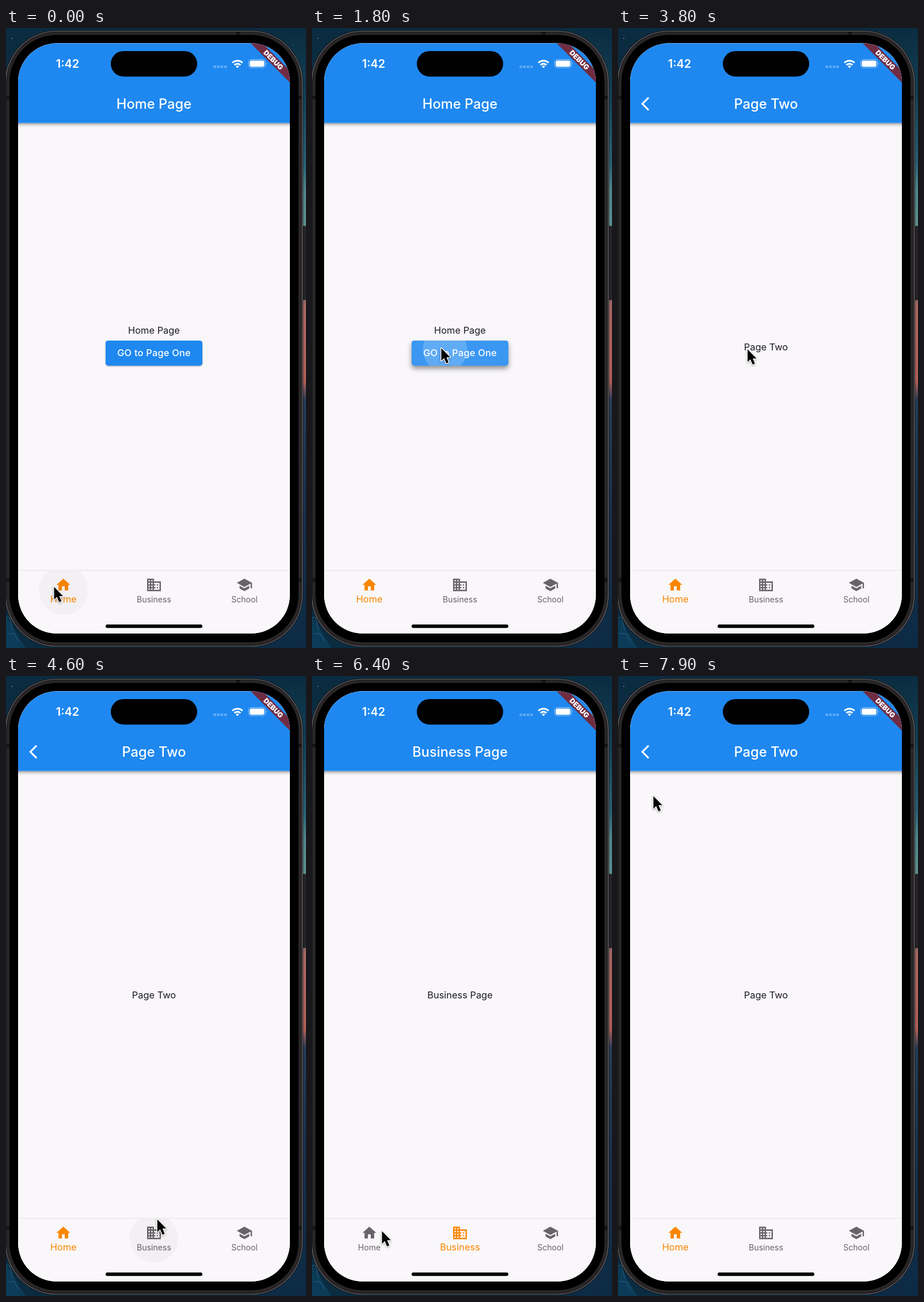
An HTML page that plays this animation: 521 px wide and 1075 px high, repeating every 8 s.

```html
<!DOCTYPE html>
<html lang="en">
<head>
<meta charset="utf-8">
<title>Tab navigation demo</title>
<style>
  html, body { margin: 0; width: 100%; height: 100%; overflow: hidden; background: #0a2b40; }
  svg { display: block; width: 521px; height: 1075px; font-family: Inter, Roboto, sans-serif; }
  .mid { text-anchor: middle; }
  .title { font-size: 23.7px; font-weight: 500; fill: #fff; }
  .body { font-size: 16.4px; fill: #1d1b20; }
  .btn { font-size: 16.4px; font-weight: 500; fill: #fff; letter-spacing: .2px; }
</style>
</head>
<body>
<svg viewBox="0 0 521 1075" xmlns="http://www.w3.org/2000/svg">
  <defs>
    <clipPath id="screen"><rect x="21" y="26.6" width="472" height="1023.2" rx="67"/></clipPath>
    <clipPath id="btnClip"><rect x="173" y="542" width="168" height="43.4" rx="4.5"/></clipPath>
    <clipPath id="navClip"><rect x="21" y="941" width="472" height="109"/></clipPath>
    <linearGradient id="wall" x1="0" y1="0" x2="0" y2="1">
      <stop offset="0" stop-color="#0b2c40"/>
      <stop offset=".11" stop-color="#123f55"/>
      <stop offset=".22" stop-color="#286174"/>
      <stop offset=".26" stop-color="#4b8487"/>
      <stop offset=".32" stop-color="#5c8f8e"/>
      <stop offset=".43" stop-color="#7e6c6c"/>
      <stop offset=".45" stop-color="#a7645f"/>
      <stop offset=".57" stop-color="#b05d55"/>
      <stop offset=".6" stop-color="#243c55"/>
      <stop offset=".8" stop-color="#142f4a"/>
      <stop offset="1" stop-color="#0d2b45"/>
    </linearGradient>
    <linearGradient id="barShade" x1="0" y1="0" x2="0" y2="1">
      <stop offset="0" stop-opacity=".38"/>
      <stop offset=".45" stop-opacity=".13"/>
      <stop offset="1" stop-opacity="0"/>
    </linearGradient>
  </defs>

  <rect width="521" height="1075" fill="#0b2b40"/>
  <rect x="440" width="81" height="1075" fill="url(#wall)"/>
  <path d="M0 1020L34 1075H0Z" fill="#0b3b57"/>
  <path d="M0 1022H6L12 1044M2 1050H14L22 1064" fill="none" stroke="#2d6380"/>
  <circle cx="10" cy="18" r="1" fill="#5b8ca0"/>
  <rect x="513" y="343" width="8" height="129" rx="2" fill="#262326"/>

  <rect x="-.5" y="5.5" width="515" height="1066.5" rx="89" fill="#2a2628" stroke="#121012" stroke-width="3"/>
  <rect x="-.5" y="5.5" width="515" height="1066.5" rx="89" fill="none" stroke="#777375" stroke-width="1.2"/>
  <path d="M399 6v7h7V6ZM0 117h6v7H0ZM0 954h6v7H0ZM508 117h6v7h-6ZM508 954h6v7h-6Z" fill="#171516"/>
  <rect x="6" y="12" width="502" height="1053" rx="82"/>

  <g clip-path="url(#screen)">
    <rect x="21" y="26" width="472" height="1024" fill="#f9f7fa"/>
    <g id="pages"></g>

    <rect x="21" y="941" width="472" height="109" fill="#f9f7fa"/>
    <rect x="21" y="939.5" width="472" height="2" fill="#eeebef"/>
    <g id="tabs"></g>
    <g id="glow" clip-path="url(#navClip)"></g>
    <rect x="173" y="1034.3" width="168" height="6" rx="3"/>

    <text x="86.7" y="69" font-size="20" font-weight="600" fill="#fff">1:42</text>
    <rect x="182" y="39.9" width="150" height="44.4" rx="22.2"/>
    <path d="M360.5 67.2h23" stroke="#fff" stroke-opacity=".32" stroke-width="4" stroke-dasharray="4.4 1.8"/>
    <g fill="none" stroke="#fff" stroke-width="2.9">
      <path d="M393.2 60.3a12.6 12.6 0 0 1 17.6 0"/>
      <path d="M396.7 64.1a7.6 7.6 0 0 1 10.6 0"/>
    </g>
    <path d="M402 69.6l-2.9-3a4.2 4.2 0 0 1 5.8 0Z" fill="#fff"/>
    <rect x="421.4" y="54.6" width="29" height="14.4" rx="4.6" fill="none" stroke="#fff" stroke-opacity=".45" stroke-width="1.2"/>
    <rect x="423.3" y="56.4" width="25.2" height="10.8" rx="3" fill="#fff"/>
    <path d="M451.8 59.5q2.2 2.3 0 4.6Z" fill="#fff" fill-opacity=".5"/>

    <g transform="translate(493 26.6) rotate(45)">
      <rect x="-60" y="33.6" width="120" height="14.4" fill="#702c42"/>
      <text class="mid" y="45" font-size="12.2" font-weight="900" fill="#fff">DEBUG</text>
    </g>
  </g>

  <g id="ring" fill="none">
    <circle r="34" stroke="#fff" stroke-width="4.4" stroke-opacity=".75"/>
    <circle r="34" stroke="#000" stroke-width="2.4"/>
  </g>
  <path id="cursor" d="M0 0V22L4.9 17.4L8.8 26.5L12.8 24.8L9 15.9H15.6Z" stroke="#fff" stroke-width="2.8" paint-order="stroke" stroke-linejoin="round"
    style="filter:drop-shadow(0 1.5px 1.5px rgba(0,0,0,.35))"/>
</svg>
<script>
const LOOP = 8000, STEP = 100, WIDTH = 472;
const GREY = [104, 100, 104], ORANGE = [250, 134, 0];
const $ = id => document.getElementById(id);
const set = (el, attrs) => { for (const k in attrs) el.setAttribute(k, attrs[k]); };
const show = (el, on) => { el.style.display = on ? '' : 'none'; };
const ramp = (t, a, b) => Math.min(1, Math.max(0, (t - a) / (b - a)));
const mix = (a, b, u) => a + (b - a) * u;
const smooth = u => u * u * (3 - 2 * u);
const slide = u => 1 - (1 - u) ** 4;

const button = (id, label) => `
  <rect id="${id}Btn" x="173" y="542" width="168" height="43.4" rx="4.5" fill="#1e88f0"/>
  <g clip-path="url(#btnClip)" fill="#fff">
    <rect id="${id}Tint" x="173" y="542" width="168" height="44"/>
    <circle id="${id}Splash"/>
  </g>
  <text class="mid btn" x="257" y="569.3">${label}</text>`;

const page = (id, title, text, label, back) => `
  <g id="${id}">
    <rect x="21" y="26" width="472" height="915" fill="#f9f7fa"/>
    <rect x="21" y="164.6" width="472" height="7.4" fill="url(#barShade)"/>
    <rect x="21" y="26" width="472" height="138.6" fill="#1e88f0"/>
    <text class="mid title" x="257" y="139.6">${title}</text>
    ${back ? '<path transform="translate(40.2 117.1) scale(1.2)" d="M11.67 3.87L9.9 2.1 0 12l9.9 9.9 1.77-1.77L3.54 12z" fill="#fff"/>' : ''}
    <text class="mid body" x="257" y="${label ? 530 : 559}">${text}</text>
    ${label ? button(id, label) : ''}
  </g>`;

$('pages').innerHTML =
  page('home', 'Home Page', 'Home Page', 'GO to Page One') +
  page('one', 'Page One', 'Home Page', 'GO to Page Two', true) +
  page('two', 'Page Two', 'Page Two', '', true) +
  page('biz', 'Business Page', 'Business Page');

const tabs = [
  ['Home', 99.6, 'M10 20v-6h4v6h5v-8h3L12 3 2 12h3v8z'],
  ['Business', 257, 'M12 7V3H2v18h20V7H12zM6 19H4v-2h2v2zm0-4H4v-2h2v2zm0-4H4V9h2v2zm0-4H4V5h2v2zm4 12H8v-2h2v2zm0-4H8v-2h2v2zm0-4H8V9h2v2zm0-4H8V5h2v2zm10 12h-8v-2h2v-2h-2v-2h2v-2h-2V9h8v10zm-2-8h-2v2h2v-2zm0 4h-2v2h2v-2z'],
  ['School', 414, 'M5 13.18v4L12 21l7-3.82v-4L12 17l-7-3.82zM12 3L1 9l11 6 9-4.91V17h2V9L12 3z']
];
$('tabs').innerHTML = tabs.map(([name, x, d], i) => `
  <g id="tab${i}">
    <path transform="translate(${x - 14.4} 951.2) scale(1.2)" d="${d}"/>
    <text class="mid" x="${x}" y="996">${name}</text>
  </g>`).join('');
$('glow').innerHTML = tabs.map(([, x], i) => `
  <circle id="hover${i}" cx="${x}" cy="975" r="42.5" fill-opacity=".028"/>
  <circle id="tap${i}" cx="${x}" cy="975"/>`).join('');

// Pointer stops: time, x, y
const stops = [
  [0, 83.5, 969], [300, 83.5, 969], [1100, 224.5, 555], [2500, 224.5, 555],
  [2700, 225, 557], [3900, 225, 557], [4700, 264.5, 959.5], [6100, 264.5, 959.5],
  [6500, 95, 963], [7300, 95, 963], [8040, 58, 130]
];
// Mouse held down: from, to
const presses = [[1600, 1800], [2800, 3000], [4900, 5000], [6700, 6800]];
const pushes = { one: 1900, two: 3100 };
const BIZ_TAP = 5000, HOME_TAP = 6800;

function pointer(t) {
  let i = 0;
  while (i < stops.length - 2 && t >= stops[i + 1][0]) i++;
  const [a, b] = [stops[i], stops[i + 1]];
  const u = smooth(ramp(t, a[0], b[0]));
  return [mix(a[1], b[1], u), mix(a[2], b[2], u)];
}

function drawButton(id, t, down) {
  const lift = ramp(t, down, down + 200), dt = t - down, late = Math.max(0, dt - 200);
  $(id + 'Btn').style.filter =
    `drop-shadow(0 ${mix(1.5, 5, lift)}px ${mix(1.3, 4.5, lift)}px rgba(0,0,0,${mix(.34, .42, lift)}))`;
  set($(id + 'Tint'), { 'fill-opacity': .13 * lift });
  const shift = Math.min(1, dt * .001 + late * .002);
  set($(id + 'Splash'), {
    cx: mix(224.5, 257, shift), cy: mix(556, 564, shift),
    r: dt < 0 ? 0 : 28 + .053 * dt + .25 * late,
    'fill-opacity': .19 * (1 - ramp(late, 0, 375))
  });
}

function drawTab(i, t, x, y) {
  const biz = ramp(t, BIZ_TAP, BIZ_TAP + 200) - ramp(t, HOME_TAP, HOME_TAP + 200);
  const on = [1 - biz, biz, 0][i];
  const [, label] = $('tab' + i).children;
  set($('tab' + i), { fill: `rgb(${GREY.map((c, k) => Math.round(mix(c, ORANGE[k], on)))})` });
  set(label, { 'font-size': mix(14.1, 16.4, on) });
  const left = 21 + i * WIDTH / 3;
  show($('hover' + i), y > 941 && x >= left && x < left + WIDTH / 3 && !(t >= 6300 && t < 6500));
  const down = [6700, 4900, Infinity][i];
  set($('tap' + i), {
    r: 42.5 * slide(ramp(t, down, down + 300)),
    'fill-opacity': t < down ? 0 : .05 * (1 - ramp(t, down + 100, down + 350))
  });
}

function draw(t) {
  const [x, y] = pointer(t);
  const one = slide(ramp(t, pushes.one, pushes.one + 500));
  const two = slide(ramp(t, pushes.two, pushes.two + 500));
  const place = (id, enter, leave) => {
    set($(id), { transform: `translate(${WIDTH * (1 - enter) - WIDTH / 3 * leave} 0)` });
    show($(id), enter > 0 && leave < 1);
  };
  place('home', 1, one);
  place('one', one, two);
  place('two', two, 0);
  show($('biz'), t >= BIZ_TAP && t < HOME_TAP);

  drawButton('home', t, presses[0][0]);
  drawButton('one', t, presses[1][0]);
  tabs.forEach((_, i) => drawTab(i, t, x, y));

  set($('cursor'), { transform: `translate(${x} ${y})` });
  set($('ring'), { transform: `translate(${x} ${y + 2})` });
  show($('ring'), presses.some(([a, b]) => t >= a && t < b));
}

const start = performance.now();
function tick(now) {
  const t = Math.max(0, now - start) % LOOP;
  draw(Math.floor(t / STEP) * STEP);
  requestAnimationFrame(tick);
}
draw(0);
requestAnimationFrame(tick);
</script>
</body>
</html>
```
